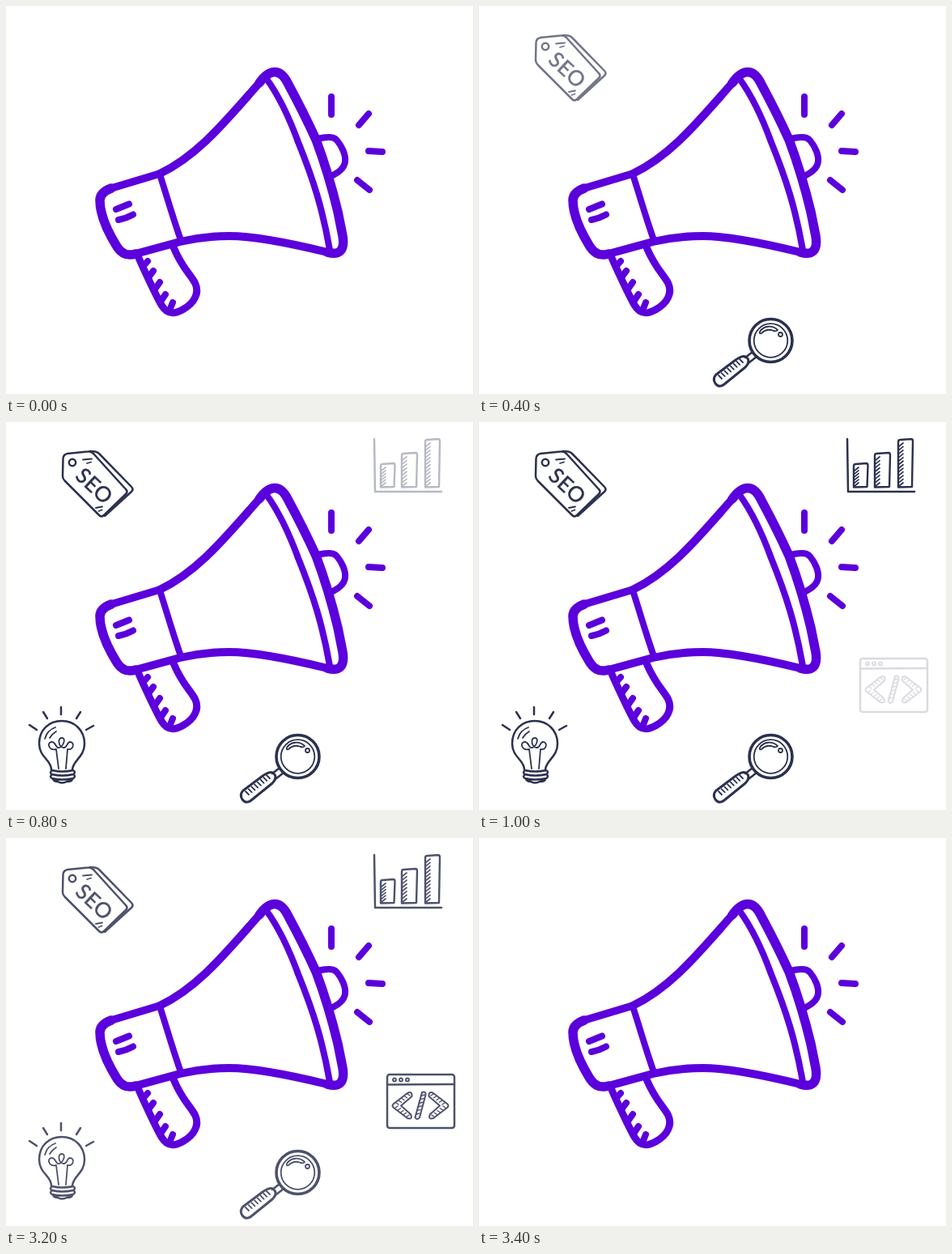
These frames come from a looping animation (577 px wide and 479 px high, 3440 ms). An HTML page:

```html
<!DOCTYPE html>
<html lang="en">
<head>
<meta charset="utf-8">
<title>Marketing megaphone</title>
<style>
  html, body { margin: 0; width: 100%; height: 100%; overflow: hidden; background: #fff; }
  svg { display: block; width: 100%; height: 100%; }
  path, circle, rect, ellipse { fill: none; }
  #horn { stroke: #5b00dc; stroke-linecap: round; stroke-linejoin: round; stroke-width: 8; }
  .icon { stroke: #2b314f; stroke-width: 2.5; stroke-linecap: round; stroke-linejoin: round; opacity: 0; }
  .icon .thin { stroke-width: 1.8; }
  .icon text { font: 26px Lato, "Open Sans", sans-serif; letter-spacing: .5px; fill: #2b314f; stroke-width: .5; }
</style>
</head>
<body>
<svg viewBox="0 0 577 479">
  <g id="horn">
    <path stroke-width="10" d="M190 207C238 184 272 141 313 95"/>
    <path stroke-width="11.5" d="M313 95C326 77 339 77 348 95C362 121 373 143 383 165C395 197 404 229 410 254L416 284C419 303 411 308 397 304"/>
    <path stroke-width="10" d="M397 304C352 293 306 284 276 284C251 284 232 287 215 291L160 306"/>
    <path stroke-width="11.5" d="M160 306C150 309 143 306 137 297C124 276 116 256 116 240C116 232 122 228 130 225"/>
    <path stroke-width="9.5" d="M130 225L190 207"/>
    <path d="M190 208C197 229 206 261 216 289M322 90C338 112 350 138 361 168C380 215 391 250 400 301"/>
    <path d="M385 164C397 161 405 161 409 166C415 173 420 184 419 192C418 201 410 206 400 211"/>
    <path d="M402 112V134M448 133L436 147M448 179L465 180M434 215L449 227"/>
    <path d="M136 251L152 244.500M139 264Q149 262 157 257.500"/>
    <path stroke-width="9" d="M164 311C175 335 184 355 192 369C199 381 207 381 218 375C233 367 239 354 234 343C229 332 219 326 207 298"/>
    <path d="M175 315L169 322M182 327L176 335M190 341L183 351M197 356L191 365M206 366L202 376"/>
  </g>

  <g class="icon" id="lens">
    <circle cx="360.500" cy="413" r="26.500" stroke-width="3.600"/>
    <circle cx="360.500" cy="413" r="20.800" class="thin"/>
    <path class="thin" d="M347 402C352 394 363 394 369 400C367 403 365 401 361 400C356 399 352 401 349 404Q346 405 347 402Z"/>
    <circle class="thin" cx="372.500" cy="405.500" r="2.500"/>
    <path d="M338 427L329 434M343 433L334 440"/>
    <path stroke-width="3" d="M317 437Q327 430 331 434Q336 439 329 446L303 467Q297 472 292 466Q288 460 293 455Z"/>
  </g>

  <g class="icon" id="tag">
    <path d="M76 39L101 36.500Q105 36 108 39L148 83Q151 86 148 89L121 115Q118 118 115 115L73 73Q70 70 70 67L70.500 45Q71 40 76 39Z"/>
    <path d="M104 36L110 36.500Q113 37 115 39L155 80Q158 83 155 86L122 116"/>
    <circle cx="82" cy="50" r="4.200"/>
    <path class="thin" d="M95 46.500L106 45.500M100 51L105 49.500M111 106L119 104.500M114.500 110L118.500 108.500"/>
    <text transform="translate(109 79) rotate(43)" y="9" text-anchor="middle">SEO</text>
  </g>

  <g class="icon" id="bulb">
    <path d="M56 429C56 417 41 414 41 397C41 380 53 369 69 369C85 369 97 381 97 397C97 414 83 417 82 429"/>
    <path d="M29 374L38 380M46 358L51 366M68 352V361M92 358L87 366M108 375L99 380"/>
    <path class="thin" d="M48 391C50 384 55 379 61 377M54 390Q57 385 62 382"/>
    <path class="thin" d="M65 428L62 404C53 406 50 396 56 395C62 394 61 404 66 402C72 399 74 390 69 390C63 390 65 401 71 402C76 403 75 395 79 395C85 395 84 405 76 404L74 428"/>
    <path d="M57 430Q69 433 83 430Q87 432 83 435Q69 438 57 435Q53 433 57 430M57 435Q53 438 57 440Q69 443 83 440Q87 437 83 435M58 441Q60 444 64 444Q69 447 75 444Q81 444 82 441"/>
  </g>

  <g class="icon" id="chart">
    <path d="M455 21L456 86L538 86"/>
  </g>

  <g class="icon" id="code">
    <rect x="471" y="292" width="83" height="66" rx="3"/>
    <path d="M471 304.500L554 304"/>
    <g class="thin">
      <circle cx="480" cy="298.500" r="2"/><circle cx="488" cy="298.500" r="2"/><circle cx="496" cy="298.500" r="2"/>
    </g>
    <path stroke-width="2" d="M514 314Q519 312 518.500 317L511 345Q508 349 505.500 345Z"/>
  </g>
</svg>
<script>
const NS = "http://www.w3.org/2000/svg";
const LOOP = 3440, TICK = 40, FADE = 6, OUT = 85;
const icons = ["lens", "tag", "bulb", "chart", "code"].map(id => document.getElementById(id));
const [lens, , , chart, code] = icons;

function addPath(group, d, width) {
  const p = document.createElementNS(NS, "path");
  p.setAttribute("d", d);
  p.setAttribute("stroke-width", width);
  group.appendChild(p);
}

// A row of n short strokes spread from (x1,y1) to (x2,y2).
function hatch(group, x1, y1, x2, y2, n, dx, dy, width = 1.7) {
  let d = "";
  for (let i = 0; i < n; i++) {
    const u = i / (n - 1);
    d += `M${x1 + (x2 - x1) * u} ${y1 + (y2 - y1) * u}l${dx} ${dy}`;
  }
  addPath(group, d, width);
}

hatch(lens, 296, 456, 322, 436, 8, 4, 4, 1.8);

for (const [x, y, w] of [[463, 52, 17.5], [489, 39, 19], [518, 22, 18]]) {
  addPath(chart, `M${x + 2} ${y}L${x + w - 2} ${y - 1}Q${x + w} ${y - 1} ${x + w} ${y + 2}L${x + w - 1} 80L${x} 80.500L${x} ${y + 3}Q${x} ${y} ${x + 2} ${y}Z`, 2.4);
  hatch(chart, x + 1, y + 8, x + 1, 79, Math.round((80 - y) / 5), 5, -4);
}

// Both angle brackets share one shape, mirrored about x = 512.
for (const flip of [x => x, x => 1024 - x]) {
  const pt = (x, y) => `${flip(x)} ${y} `;
  const side = flip(0) ? -1 : 1;
  addPath(code, "M" + pt(496, 315) + "Q" + pt(502, 312) + pt(501.5, 319) + "L" + pt(488, 330.5) +
    "L" + pt(500, 341) + "Q" + pt(503, 348) + pt(496, 346) + "L" + pt(479, 333) +
    "Q" + pt(476, 330.5) + pt(479, 328) + "Z", 2);
  hatch(code, flip(482), 327, flip(496), 316, 5, 3 * side, 2, 1.5);
  hatch(code, flip(481), 333, flip(495), 344, 5, 3 * side, -2, 1.5);
}
hatch(code, 507.5, 341, 514, 318, 6, 3, -1, 1.5);

const clamp = v => Math.max(0, Math.min(1, v));

function draw(ms) {
  const step = Math.floor((ms % LOOP) / TICK);
  const out = clamp((OUT - step) / FADE);
  icons.forEach((icon, i) => {
    icon.style.opacity = Math.min(out, clamp((step - i * FADE) / FADE));
  });
}

let start;
function tick(now) {
  start ??= now;
  draw(now - start);
  requestAnimationFrame(tick);
}
draw(0);
requestAnimationFrame(tick);
</script>
</body>
</html>
```
